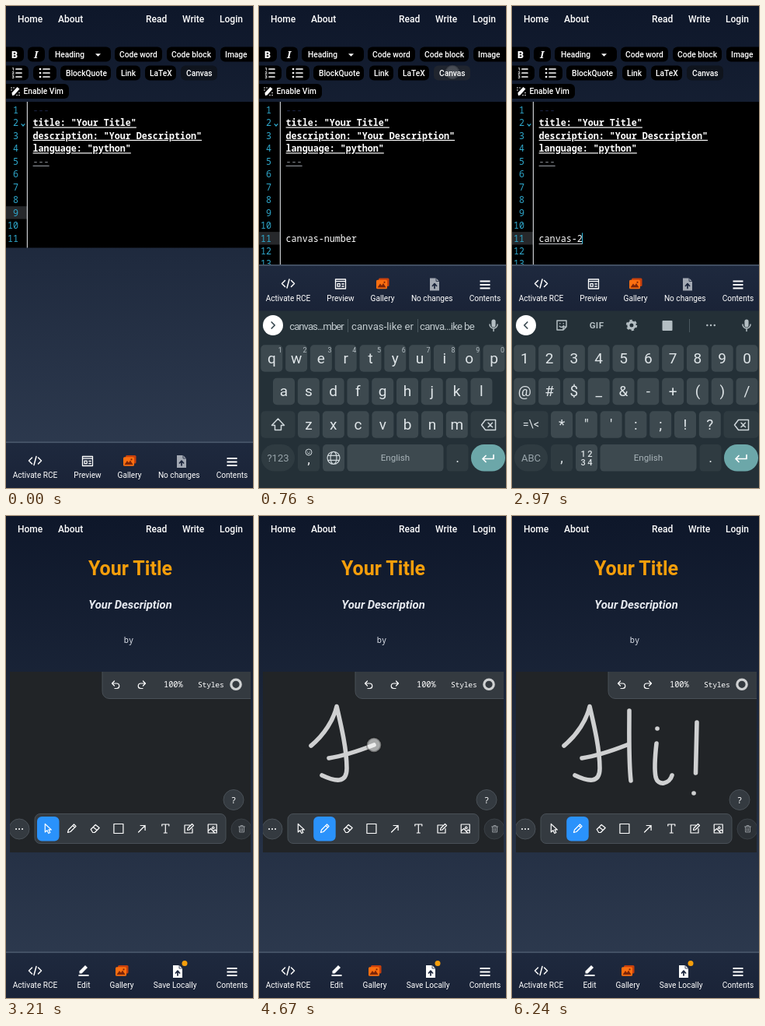
An HTML page for the animation above (6.27 s loop, 318 by 619 pixels).

```html
<!DOCTYPE html>
<html lang="en">
<head>
<meta charset="utf-8">
<title>Markdown editor with canvas</title>
<style>
html, body { margin: 0; width: 100%; height: 100%; overflow: hidden; background: #0e172b; }
svg { display: block; width: 318px; height: 619px; }
text { font-family: Roboto, sans-serif; fill: #fff; white-space: pre; }
.mono { font-family: "Noto Sans Mono", monospace; }
.serif { font-family: "Noto Serif", serif; }
</style>
</head>
<body>
<svg id="stage" viewBox="0 0 318 619">
  <defs>
    <linearGradient id="sky" x2="0" y2="1"><stop stop-color="#0e172a"/><stop offset="1" stop-color="#2f3c51"/></linearGradient>
    <linearGradient id="bar" x2="0" y2="1"><stop stop-color="#1e293e"/><stop offset="1" stop-color="#1a2337"/></linearGradient>
    <clipPath id="board"><rect x="5" y="200" width="310" height="232"/></clipPath>
  </defs>
</svg>
<script>
const LOOP = 6270;
const stage = document.getElementById('stage');

function el(parent, tag, attrs = {}, content) {
  const node = document.createElementNS('http://www.w3.org/2000/svg', tag);
  for (const k in attrs) node.setAttribute(k, attrs[k]);
  if (content !== undefined) node.textContent = content;
  return parent.appendChild(node);
}
const group = (parent, attrs) => el(parent, 'g', attrs);
const rect = (p, x, y, width, height, fill, attrs) => el(p, 'rect', { x, y, width, height, fill, ...attrs });
const circle = (p, cx, cy, r, fill, attrs) => el(p, 'circle', { cx, cy, r, fill, ...attrs });
const label = (p, x, y, str, size, attrs) => el(p, 'text', { x, y, 'font-size': size, ...attrs }, str);
const mid = (p, x, y, str, size, attrs) => label(p, x, y, str, size, { 'text-anchor': 'middle', ...attrs });
const line = (p, x, y, d, attrs) => el(p, 'path', {
  d, transform: `translate(${x} ${y})`, fill: 'none', stroke: '#fff', 'stroke-width': 1.2,
  'stroke-linecap': 'round', 'stroke-linejoin': 'round', ...attrs });
const solid = (p, x, y, d, fill = '#fff') => line(p, x, y, d, { fill, stroke: 'none' });
const show = (node, on) => { node.style.display = on ? '' : 'none'; };
const span = (t, a, b) => Math.min(1, Math.max(0, (t - a) / (b - a)));

rect(stage, 0, 0, 318, 619, 'url(#sky)');
const editPage = group(stage), viewPage = group(stage);

for (const [x, name] of [[15, 'Home'], [67, 'About'], [180, 'Read'], [227, 'Write'], [275, 'Login']])
  label(stage, x, 21, name, 12, { 'font-weight': 500 });

// Formatting buttons
function pill(x, y, w, name, tx) {
  const box = rect(editPage, x, y - 9.5, w, 19, '#000', { rx: 6 });
  if (name) label(editPage, tx, y + 3.7, name, 10.2, { 'font-weight': 500 });
  return box;
}
pill(-6, 62, 29);
label(editPage, 7, 66.5, 'B', 12.5, { 'font-weight': 800 });
pill(28, 62, 22);
label(editPage, 36, 66.5, 'I', 13, { class: 'serif', 'font-style': 'italic', 'font-weight': 700 });
pill(55, 62, 80, 'Heading', 63);
solid(editPage, 118.5, 63, 'M-3.5-1.8h7L0 1.8Z');
pill(140, 62, 61, 'Code word', 146);
pill(207, 62, 63, 'Code block', 213);
pill(276, 62, 50, 'Image', 282);
pill(-6, 86, 35);
line(editPage, 14, 86, 'M-1-5h7M-1 0h7M-1 5h7', { 'stroke-width': 1.7 });
['1', '2', '3'].forEach((n, i) => mid(editPage, 9, 83.2 + i * 5, n, 5.6, { 'font-weight': 700 }));
pill(35, 86, 30);
line(editPage, 50, 86, 'M-2-5h8M-2 0h8M-2 5h8', { 'stroke-width': 1.7 });
line(editPage, 50, 86, 'M-6-5h.1M-6 0h.1M-6 5h.1', { 'stroke-width': 2.6 });
pill(70, 86, 65, 'BlockQuote', 77);
pill(142, 86, 31, 'Link', 148);
pill(179, 86, 40, 'LaTeX', 185);
const canvasPill = pill(225, 86, 47, 'Canvas', 232);
pill(-6, 109.5, 87, 'Enable Vim', 22.5);
solid(editPage, 12, 109.5, 'M-4 5.5-4.5 2 2.5-5.5 5.5-3-1.5 5Z');
line(editPage, 12, 109.5, 'M-5-4.5h.1M-2-4.5h.1M-5-1.5h.1M2 5h.1M5 5h.1M5 2h.1', { 'stroke-width': 1.5 });

// Code editor
const ROW = 16.45, CODE = 11.7, CHAR = CODE * .6;
const base = n => 138 + (n - 1) * ROW;
const paper = rect(editPage, 0, 123, 318, 187.5, '#000');
const activeRow = rect(editPage, 0, 0, 27, 16.4, '#26282b');
const gutter = rect(editPage, 26.8, 123, 1.2, 187.5, '#c8cbcf');
const moreRows = group(editPage);
for (let n = 1; n <= 13; n++)
  label(n > 11 ? moreRows : editPage, 16, base(n), n, CODE, { class: 'mono', 'text-anchor': 'end', style: 'fill:#2fa8cc' });
line(editPage, 22, 152.8, 'M-2-1.2 0 1.2 2-1.2', { stroke: '#2fa8cc' });
const code = (n, str, style) => label(editPage, 34.6, base(n), str, CODE, { class: 'mono', style });
code(1, '---', 'fill:#1c2445');
const head = 'font-weight:700;text-decoration:underline';
code(2, 'title: "Your Title"', head);
code(3, 'description: "Your Description"', head);
code(4, 'language: "python"', head);
code(5, '---', 'fill:#8b8f96;text-decoration:underline');
const typed = code(11, '', '');
const composing = rect(editPage, 34.6, base(11) + 2.6, 0, .9, '#d8dbe0');
const caret = rect(editPage, 0, 0, 1.1, 14, '#35b6d8');

// Rendered page
mid(viewPage, 160, 76, 'Your Title', 25, { 'font-weight': 700, style: 'fill:#f59e0b' });
mid(viewPage, 160, 119.3, 'Your Description', 14.8, { 'font-weight': 600, 'font-style': 'italic', style: 'fill:#e8ebf1' });
mid(viewPage, 158, 163, 'by', 10.3, { class: 'mono', style: 'fill:#e2e6ee' });

const board = group(viewPage, { 'clip-path': 'url(#board)' });
const edge = { stroke: '#495057', 'stroke-width': 1 };
rect(board, 5, 200, 310, 232, '#212427');
const ink = group(board, { fill: 'none', stroke: '#cfd0d1', 'stroke-width': 5.6, 'stroke-linecap': 'round', 'stroke-linejoin': 'round' });
rect(board, 124, 185, 210, 49.5, '#343a40', { rx: 9, ...edge });
line(board, 141, 217, 'M-1.5-5-4.5-2-1.5 1M-4.5-2H1.5A3.2 3.2 0 0 1 1.5 4.5H-1');
line(board, 175, 217, 'M1.5-5 4.5-2 1.5 1M4.5-2H-1.5A3.2 3.2 0 0 0-1.5 4.5H1');
label(board, 203, 220, '100%', 10.3, { class: 'mono' });
label(board, 247, 220, 'Styles', 9.8, { class: 'mono', 'letter-spacing': -.3 });
circle(board, 296, 216.3, 6.2, 'none', { stroke: '#cfd1d2', 'stroke-width': 3.2 });
circle(board, 293, 364.5, 13, '#343a40', edge);
mid(board, 293, 368.5, '?', 11, { class: 'mono' });
circle(board, 17, 402, 13, '#343a40', edge);
line(board, 17, 402, 'M-4 0h.1M0 0h.1M4 0h.1', { 'stroke-width': 1.9 });
circle(board, 303, 402, 13, '#2c3136', { stroke: '#3a4046' });
line(board, 303.5, 402, 'M-4-3h8M-3-3v7h6v-7M-1.5-3v-1.5h3V-3M-1-1v3.5M1-1v3.5', { stroke: '#8e9398', 'stroke-width': 1 });
rect(board, 37, 382.5, 246, 38, '#343a40', { rx: 7, ...edge });
const picked = rect(board, 40, 386, 28.5, 31.5, '#2a92fb', { rx: 6 });
[
  'M-4-6V4.5L-1.4 2.2.5 6 2.5 5 .7 1.4H4Z',
  'M-5 5-4 1.5 3-5.5 5.5-3-1.5 4ZM1.5-4 4-1.5',
  'M-5.5 1 .5-5 5.5-1-.5 5H-3ZM-2.5-2 2.5 2',
  'M-6-6H6V6H-6Z',
  'M-4.5 4.5 4-4M-2-4H4V2',
  'M-4.5-3.5V-5.5H4.5V-3.5M0-5.5V5.5M-2 5.5H2',
  'M1-4.5H-5.5V5.5H4.5V0M-2 2-1.5-.5 4-6 6-4 .5 1.5Z',
  'M-5.5-5.5H5.5V5.5H-5.5ZM-5.5 3-2 0 3 5.5M1.5 3 3.5 1.5 5.5 3M1-2.5a1.3 1.3 0 1 0 .1 0'
].forEach((d, i) => line(board, 54.3 + i * 30.2, 401.5, d));

// Bottom bar
const dock = group(stage);
rect(dock, 0, 560, 318, 60, 'url(#bar)');
rect(dock, 0, 559.5, 318, 1.6, '#4a586c');
const editDock = group(dock), viewDock = group(dock);
const caption = (p, x, str) => mid(p, x, 606.3, str, 10.1);
function gallery(p, x) {
  rect(p, x - 5, 577, 13.5, 10.5, '#c8400c', { rx: 1.5 });
  rect(p, x - 8, 579.3, 14, 11.5, '#fb6f10', { rx: 1.5 });
  solid(p, x - 1, 585, 'M-5.5 4-2-1 0 1.5 2-1.5 5.5 4Z', '#7c2508');
  circle(p, x + 2.5, 582.3, 1.1, '#7c2508');
  caption(p, x, 'Gallery');
}
function file(p, x, color, str) {
  solid(p, x, 585, 'M-6-8H2L6-4V8H-6Z', color);
  line(p, x, 586, 'M0 4V-1.5M-2.6 1 0-1.8 2.6 1', { stroke: '#1b253c', 'stroke-width': 1.7 });
  line(p, x, 585, 'M2-8V-4H6', { stroke: '#1b253c', 'stroke-width': .8 });
  caption(p, x - 3.3, str);
}
line(dock, 37.5, 584, 'M-4-4-8 0-4 4M4-4 8 0 4 4M1.5-5.5-1.5 5.5', { 'stroke-width': 1.5 });
caption(dock, 37.5, 'Activate RCE');
line(dock, 291, 585.5, 'M-6.5-4.5h13M-6.5 0h13M-6.5 4.5h13', { 'stroke-width': 1.9, 'stroke-linecap': 'butt' });
caption(dock, 291, 'Contents');
line(editDock, 105, 584.5, 'M-6.5-6H6.5V6H-6.5ZM-6.5-3.3H6.5M-4-.3H-.8V3.2H-4ZM1.8 0H4.2M1.8 3H4.2', { 'stroke-width': 1.3 });
caption(editDock, 105, 'Preview');
gallery(editDock, 159);
file(editDock, 226, '#a3a9b3', 'No changes');
solid(viewDock, 100, 583, 'M-5.5 4.5V1.5L2-6 5-3-2.5 4.5Z');
rect(viewDock, 93.5, 589, 13, 2, '#fff');
caption(viewDock, 100, 'Edit');
gallery(viewDock, 149);
file(viewDock, 221, '#fff', 'Save Locally');
circle(viewDock, 230, 574.5, 3.5, '#f59e0b');

// Keyboard
const keyboard = group(stage);
const KEY = '#3d494f', DIM = '#2f3b41', PITCH = 31.8, INK = '#dfe5e8', SOFT = '#b4bec3', FAINT = '#98a4aa';
rect(keyboard, 0, 391.5, 318, 228, '#243037');
function key(p, cx, cy, w, str, size = 19, fill = KEY, rx = 5, color = INK) {
  rect(p, cx - w / 2, cy - 17.3, w, 34.6, fill, { rx });
  if (str) mid(p, cx, cy + size * .34, str, size, { style: 'fill:' + color });
}
function keyRow(p, x, cy, chars) {
  [...chars].forEach((c, i) => key(p, x + i * PITCH, cy, 28, c));
}
const letters = group(keyboard), symbols = group(keyboard);
keyRow(letters, 16.3, 452.5, 'qwertyuiop');
[...'1234567890'].forEach((n, i) => mid(letters, 27.3 + i * PITCH, 444.8, n, 8.8, { style: 'fill:' + SOFT }));
keyRow(letters, 32, 495, 'asdfghjkl');
keyRow(letters, 64, 537.5, 'zxcvbnm');
key(letters, 24.5, 537.5, 44, '', 0, DIM);
line(letters, 24.5, 538, 'M0-8 8 .5H4V6.5H-4V.5H-8Z', { stroke: '#cfd7db', 'stroke-width': 1.5 });
key(letters, 24.5, 580.3, 43, '?123', 13, DIM, 17, FAINT);
key(letters, 64, 580.3, 28, '', 0, DIM);
circle(letters, 64, 573, 4, 'none', { stroke: '#cfd7db' });
line(letters, 64, 573, 'M-1.7 1Q0 2.8 1.7 1M-1.4-1h.1M1.4-1h.1', { stroke: '#cfd7db', 'stroke-width': .9 });
mid(letters, 64, 588, ',', 16);
key(letters, 96, 580.3, 28, '', 0, KEY);
line(letters, 96, 580.3, 'M-8 0a8 8 0 1 0 16 0a8 8 0 1 0-16 0M-4 0a4 8 0 1 0 8 0a4 8 0 1 0-8 0M-7.5-3h15M-7.5 3h15', { stroke: '#cfd7db' });

keyRow(symbols, 16.3, 452.5, '1234567890');
keyRow(symbols, 16.3, 495, '@#$_&-+()/');
keyRow(symbols, 64, 537.5, '*"\':;!?');
key(symbols, 24.5, 537.5, 44, '=\\<', 14.5, DIM);
key(symbols, 24.5, 580.3, 43, 'ABC', 13, DIM, 17, FAINT);
key(symbols, 64, 580.3, 28, ',', 18, DIM);
key(symbols, 96, 580.3, 28, '', 0, KEY);
mid(symbols, 96, 578.5, '1 2', 11, { 'font-weight': 500, style: 'fill:' + INK });
mid(symbols, 96, 589.5, '3 4', 11, { 'font-weight': 500, style: 'fill:' + INK });

key(keyboard, 295, 537.5, 45, '', 0, DIM);
line(keyboard, 295.5, 538, 'M-9 0-4-6.5H9V6.5H-4ZM-.5-2.7 5 2.7M5-2.7-.5 2.7', { stroke: '#cfd7db', 'stroke-width': 1.5 });
key(keyboard, 175.5, 580.3, 124, 'English', 11.6, KEY, 5, '#a9b4b9');
key(keyboard, 255.5, 580.3, 28, '.', 18, DIM);
key(keyboard, 295, 580.3, 44, '', 0, '#6ca7a9', 17);
line(keyboard, 295, 580.5, 'M7-4V1H-7M-3-3-7 1-3 5', { 'stroke-width': 1.7 });

circle(keyboard, 18, 410, 13, '#fff');
solid(keyboard, 302, 410, 'M-2.6-5a2.6 2.6 0 0 1 5.2 0V0a2.6 2.6 0 0 1-5.2 0Z', SOFT);
line(keyboard, 302, 410, 'M-5-1a5 5 0 0 0 10 0M0 4V7.5', { stroke: SOFT, 'stroke-width': 1.5 });
const hints = group(keyboard), tools = group(keyboard);
line(hints, 18, 410, 'M-1.8-4 2.2 0-1.8 4', { stroke: '#37474f', 'stroke-width': 1.7 });
const hint = (x, str, gap) => mid(hints, x, 416, str, 13.2, { 'letter-spacing': gap, style: 'fill:#c3ccd0' });
hint(74, 'canvas...mber', -1);
hint(159, 'canvas-like er', 0);
hint(242, 'canva...ike be', -.7);
for (const x of [114, 204]) rect(hints, x, 402, 1, 17, '#4b585f');

line(tools, 18, 410, 'M1.8-4-2.2 0 1.8 4', { stroke: '#37474f', 'stroke-width': 1.7 });
line(tools, 64, 410, 'M-6-6H6V2L2 6H-6ZM2 6V2H6M-2.8 1.2Q0 4 2.6.6M-2.2-2.2h.1M2.2-2.2h.1', { stroke: SOFT, 'stroke-width': 1.5 });
mid(tools, 109, 414.2, 'GIF', 11.5, { 'font-weight': 700, 'letter-spacing': .4, style: 'fill:' + SOFT });
circle(tools, 154, 410, 4.1, 'none', { stroke: SOFT, 'stroke-width': 3.2 });
circle(tools, 154, 410, 6.2, 'none', { stroke: SOFT, 'stroke-width': 2, 'stroke-dasharray': '3.25 3.24' });
rect(tools, 193.5, 404, 13, 13, SOFT, { rx: 1 });
rect(tools, 228, 402, 1, 17, '#4b585f');
line(tools, 256, 410, 'M-4.7 0h.1M0 0h.1M4.7 0h.1', { stroke: SOFT, 'stroke-width': 2.4 });

// Handwriting: path, start, end
const strokes = [
  ['M67 295C84 281 96 262 100 244.5C106 270 113 300 113 324C113 344 98 341 81 333', 3960, 4390],
  ['M90 311C110 308 130 301 148 294', 4530, 4670],
  ['M151 250C151 280 150 312 153 340', 4850, 5020],
  ['M186 292C184 310 183 325 185 335C188 348 203 344 206 333', 5150, 5390],
  ['M187 273h.1', 5510, 5560],
  ['M238 265 236.5 330', 5710, 5840],
  ['M234 356h.1', 5970, 6020]
].map(([d, from, to]) => {
  const path = el(ink, 'path', { d }), size = path.getTotalLength();
  return { path, size, from, to };
});

// Taps: x, y, press, release
const ERASE = [1300, 1415, 1530, 1640, 1755, 1975];
const taps = [
  [90, 265, 70, 150], [249, 85, 620, 690],
  ...ERASE.map(t => [296, 538, t - 30, t + 20]),
  [24, 580, 2250, 2330], [48, 453, 2600, 2680],
  [105, 362, 3040, 3110], [85, 401, 3560, 3650]
];
const touch = group(stage);
circle(touch, 0, 0, 9.3, '#fff', { 'fill-opacity': .5, stroke: '#000', 'stroke-opacity': .28, 'stroke-width': 2 });
circle(touch, 0, 0, 7.5, '#fff', { 'fill-opacity': .22 });

const INSERT = 670, SYMBOLS = 2310, DIGIT = 2650, PREVIEW = 3110, PEN = 3630;
const ease = p => 1 - (1 - p) ** 3;

function finger(t) {
  for (const s of strokes)
    if (t >= s.from && t < s.to + 100) {
      const p = s.path.getPointAtLength(s.size * span(t, s.from, s.to));
      return [p.x, p.y, 1 - span(t, s.to + 60, s.to + 100)];
    }
  for (const [x, y, a, b] of taps)
    if (t >= a && t < b + 100) return [x, y, 1 - span(t, b, b + 100)];
  return [0, 0, 0];
}

function content(t) {
  if (t < INSERT) return '';
  if (t >= DIGIT) return 'canvas-2';
  return 'canvas-number'.slice(0, 13 - ERASE.filter(e => t >= e).length);
}

function draw(t) {
  const viewing = t >= PREVIEW, inserted = t >= INSERT, edited = t >= ERASE[0];
  const open = viewing ? 1 - ease(span(t, PREVIEW, 3200)) : ease(span(t, 270, 480));
  dock.setAttribute('transform', `translate(0 ${-227.5 * open})`);
  keyboard.setAttribute('transform', `translate(0 ${228 * (1 - open)})`);
  show(keyboard, open > 0);
  show(editPage, !viewing); show(editDock, !viewing);
  show(viewPage, viewing); show(viewDock, viewing);
  show(letters, t < SYMBOLS); show(symbols, t >= SYMBOLS);
  show(hints, inserted && !edited); show(tools, !inserted || edited);
  canvasPill.setAttribute('fill', t >= 620 && t < 900 ? '#20252f' : '#0f141d');

  const row = inserted ? 11 : 9, height = inserted ? 220.4 : 187.5, str = content(t);
  paper.setAttribute('height', height);
  gutter.setAttribute('height', height);
  show(moreRows, inserted);
  activeRow.setAttribute('y', base(row) - 12.4);
  typed.textContent = str;
  composing.setAttribute('width', edited ? str.length * CHAR : 0);
  const lastEdit = [150, 900, ...ERASE, DIGIT].filter(e => t >= e).pop();
  caret.setAttribute('x', 34.4 + str.length * CHAR - .6);
  caret.setAttribute('y', base(row) - 11.2);
  show(caret, t >= 150 && !(inserted && t < 900) && (t - lastEdit) % 1200 < 600);

  picked.setAttribute('x', t < PEN ? 40 : 70.2);
  for (const s of strokes) {
    show(s.path, t >= s.from);
    const done = s.size * span(t, s.from, s.to);
    s.path.setAttribute('stroke-dasharray', t >= s.to ? 'none' : `${Math.max(.01, done)} ${s.size + 20}`);
  }
  const [x, y, alpha] = finger(t);
  touch.setAttribute('transform', `translate(${x} ${y})`);
  touch.setAttribute('opacity', alpha);
}

const start = performance.now();
function tick() {
  draw((performance.now() - start) % LOOP);
  requestAnimationFrame(tick);
}
tick();
</script>
</body>
</html>
```
